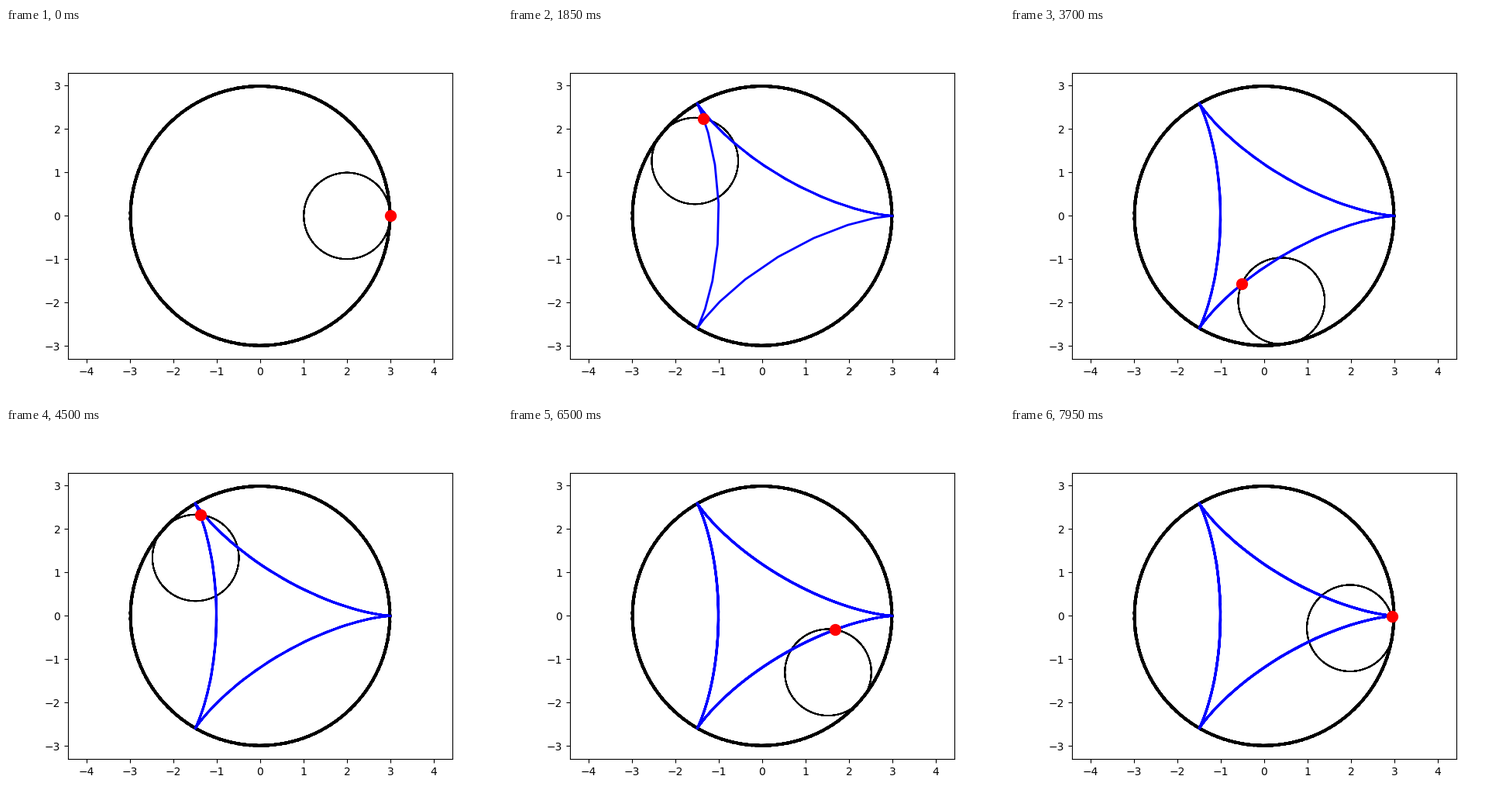
Write a matplotlib script that moves like this. It is 640 px wide and 480 px high and loops after 8000 ms.

```python
import numpy as np
import matplotlib.pyplot as plt
from matplotlib.animation import FuncAnimation

R, r = 3, 1          # fixed ring and rolling ring
FRAMES = 160

theta = np.linspace(0, 15 * 2 * np.pi, 400)
ring_x, ring_y = np.cos(theta), np.sin(theta)

# centre of the rolling ring and the point carried on its rim
centre_x, centre_y = (R - r) * ring_x, (R - r) * ring_y
spin = (R - r) / r * theta
pen_x = centre_x + r * np.cos(spin)
pen_y = centre_y - r * np.sin(spin)

fig, ax = plt.subplots(figsize=(6.4, 4.8), dpi=100)
ax.plot(R * ring_x, R * ring_y, "k", lw=2)
ax.axis("equal")
roller, = ax.plot([], [], "k", lw=1)
trail, = ax.plot([], [], "b", lw=2)
pen, = ax.plot([], [], "ro", ms=10)


def update(i):
    roller.set_data(centre_x[i] + r * ring_x, centre_y[i] + r * ring_y)
    trail.set_data(pen_x[:i + 1], pen_y[:i + 1])
    pen.set_data([pen_x[i]], [pen_y[i]])
    return roller, trail, pen


anim = FuncAnimation(fig, update, frames=FRAMES, interval=50,
                     init_func=lambda: update(0), repeat=True)
plt.show()
```
